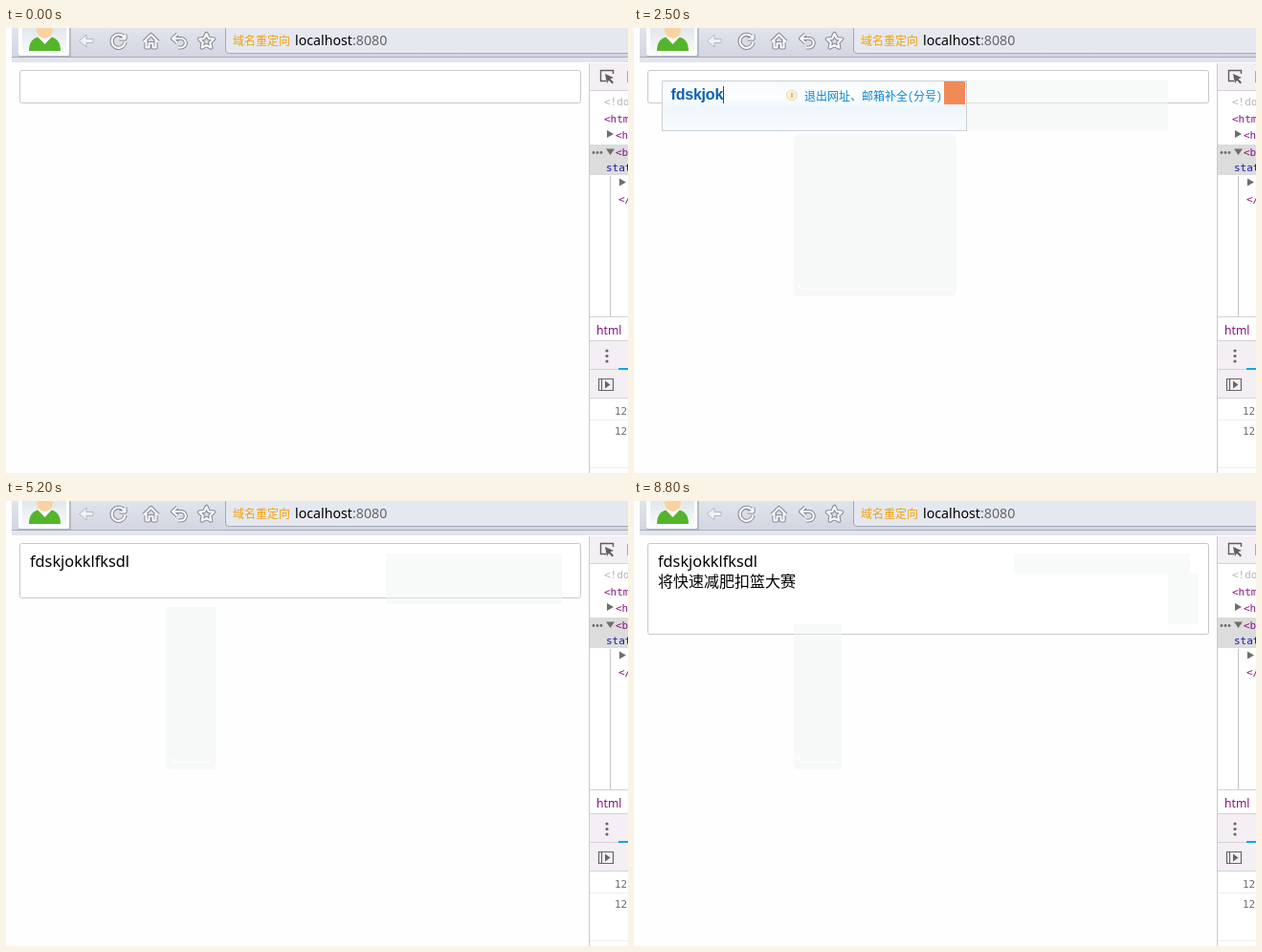
Recreate the animation shown at these times as an HTML page. Size 650 px wide and 466 px high, loop 9100 ms.

```html
<!DOCTYPE html>
<html lang="zh-CN">
<head>
<meta charset="utf-8">
<title>Input method demo</title>
<style>
html, body { margin: 0; width: 100%; height: 100%; overflow: hidden; background: #fefefe; }
svg { display: block; }
text { white-space: pre; }
.cjk { font-family: "Noto Sans CJK SC", "Noto Sans CJK", sans-serif; }
.ime { font-family: "Noto Sans Mono CJK SC", "Noto Sans CJK SC", "Noto Sans CJK", monospace; }
.ui { font-family: "Noto Sans", "Noto Sans CJK SC", sans-serif; }
.code { font-family: "DejaVu Sans Mono", monospace; }
.bold { font-family: "Liberation Sans", Arial, sans-serif; font-weight: bold; }
</style>
</head>
<body>
<svg width="650" height="466" viewBox="0 0 650 466">
  <defs>
    <linearGradient id="bar" x2="0" y2="1"><stop stop-color="#e2e4ec"/><stop offset="1" stop-color="#d3d6e1"/></linearGradient>
    <linearGradient id="pop" x2="0" y2="1">
      <stop stop-color="#f7fafc"/><stop offset=".3" stop-color="#fcfdfe"/>
      <stop offset=".55" stop-color="#eff7fc"/><stop offset="1" stop-color="#f8fbfc"/>
    </linearGradient>
    <linearGradient id="panel" x2="0" y2="1"><stop stop-color="#eef6fb"/><stop offset=".5" stop-color="#fbfdfe"/><stop offset="1" stop-color="#f1f7fb"/></linearGradient>
    <linearGradient id="photo" x2="0" y2="1"><stop stop-color="#dfe5ea"/><stop offset="1" stop-color="#f8fafb"/></linearGradient>
    <filter id="soft" x="-10%" y="-10%" width="125%" height="125%"><feDropShadow dx="1.5" dy="1.5" stdDeviation="1.3" flood-opacity=".45"/></filter>
    <clipPath id="frame"><rect x="17" y="0" width="47" height="24"/></clipPath>
  </defs>
  <g id="chrome"></g>
  <g id="live"></g>
</svg>
<script>
const LOOP = 9100, LINE = 21;
const BLUE = '#0a86d2', RED = '#e8000c', ORANGE = '#f28a58';

const text = (x, y, s, fill, size, cls = 'ui', more = '') =>
  `<text x="${x}" y="${y}" fill="${fill}" font-size="${size}" class="${cls}" ${more}>${s.replace(/</g, '&lt;')}</text>`;
const rect = (x, y, w, h, fill, more = '') =>
  `<rect x="${x}" y="${y}" width="${w}" height="${h}" fill="${fill}" ${more}/>`;
const path = (d, fill, stroke = 'none', w = 1, more = '') =>
  `<path d="${d}" fill="${fill}" stroke="${stroke}" stroke-width="${w}" ${more}/>`;
const disc = (x, y, r, fill, more = '') => `<circle cx="${x}" cy="${y}" r="${r}" fill="${fill}" ${more}/>`;
const move = (x, y, s, opacity = 1) => `<g transform="translate(${x} ${y})" opacity="${opacity}">${s}</g>`;

function browserBar() {
  // White strokes with a thin grey outline.
  const icon = d => path(d, 'none', '#858993', 4.2, 'stroke-linejoin="round"') + path(d, 'none', '#fafbfd', 2.1, 'stroke-linejoin="round"');
  return rect(6, 0, 644, 30, 'url(#bar)') + rect(6, 30, 644, 6, '#e3e4ed') + rect(6, 30, 644, 1, '#a9adbb') +
    rect(13, -4, 55, 35, '#9ca2ae', 'rx="2" opacity=".55"') + rect(13, -4, 53, 33, '#fbfcfd', 'rx="2"') +
    rect(17, -2, 46, 27, 'url(#photo)') +
    `<g clip-path="url(#frame)">` +
    path('M24 24Q24 11 35 9H46Q57 11 57 24Z', '#54b52b') +
    path('M33 9L40.500 17L48 9Z', '#fff') +
    `<ellipse cx="40.500" cy="2" rx="8.500" ry="9" fill="#f8d3a2"/></g>` +
    path('M91 11.500H84V7L76.500 13.500L84 20V15.500H91Z', '#eff1f5', '#b4b8c3') +
    icon('M123.500 10A7 7 0 1 0 124.500 15M124.500 6.500V11.500H118.500') +
    icon('M144 14.500L151.500 7L159 14.500M146.500 13V20.500H149.500V16H153.500V20.500H156.500V13') +
    icon('M179 6.500L174 11L179 15.500M174.500 11H183A4.700 4.700 0 0 1 183 20.500H180') +
    icon('M209.500 6L211.900 11L217.200 11.600L213.300 15.300L214.300 20.600L209.500 18L204.700 20.600L205.700 15.300L201.800 11.600L207.100 11Z') +
    path('M660 26.500H233Q229.500 26.500 229.500 23V-2H660', '#e6e8f0', '#a3a8b7') +
    text(237, 17.500, '域名重定向', '#f3a100', 12, 'cjk') +
    text(302, 18, 'localhost', '#000', 14.2) +
    text(362, 18, ':8080', '#666', 14.2);
}

function devTools() {
  const line = y => rect(610, y, 40, 1, '#d5d0d5');
  const code = (x, y, s, fill) => text(x, y, s, fill, 11, 'code');
  const tag = '#881280', dim = '#6e6e6e';
  const right = (x, y) => path(`M${x} ${y - 4}L${x + 7} ${y}L${x} ${y + 4}Z`, dim);
  return rect(610, 37, 40, 429, '#fff') + rect(609, 37, 1, 429, '#cbcbcb') +
    rect(610, 37, 40, 28, '#f4eff4') + line(65) +
    path('M627 55.500H621.500V44.500H634.500V48', 'none', '#5f5f5f', 1.4) +
    path('M626 48L635 52L631.500 53.200L635 57L633.500 58.500L630 54.800L628 58Z', '#5f5f5f') + rect(649, 45, 1, 12, '#aaa') +
    code(625, 81, '<!doc', '#b4b4b4') + code(625, 99, '<html', tag) +
    right(628, 111) + code(637, 116, '<he', tag) +
    rect(610, 122, 40, 32, '#dcdcdc') + [614, 618, 622].map(x => disc(x, 130.500, 1.400, dim)).join('') +
    path('M627 126.500H636L631.500 133Z', dim) + code(637, 134, '<bo', tag) +
    code(627, 150, 'stat', '#1a1aa6') + right(641, 161.500) + code(640, 183, '</b', tag) +
    rect(631, 155, 1, 147, '#c4c4c4') + line(302) +
    text(617, 321, 'html', tag, 12.2) + line(327) +
    rect(610, 328, 40, 30, '#f4eff4') + [338, 343.500, 349].map(y => disc(628, y, 1.600, '#666')).join('') +
    line(357) + rect(640, 356, 10, 2, '#10a5e8') +
    rect(610, 358, 40, 30, '#f4eff4') + line(387) +
    path('M619.500 367.500H634.500V379.500H619.500ZM622.500 367.500V379.500', 'none', '#666', 1.2) + path('M626 369.500L631.500 373.500L626 377.500Z', '#666') +
    code(636, 405, '12', dim) + rect(610, 410, 40, 1, '#ededed') + code(636, 426, '12', dim) + rect(610, 460, 40, 1, '#ededed');
}

// Width of a candidate: half-width Latin, full-width Han.
const span = s => [...s].reduce((w, c) => w + (c < '\u0100' ? 8 : 16), 0);
const pen = document.createElement('canvas').getContext('2d');
pen.font = 'bold 16px "Liberation Sans", Arial, sans-serif';

function typed(x, y, keys, gap, fill, caret) {
  const end = x + pen.measureText(keys).width + gap * keys.length;
  return text(x, y, keys, fill, 16, 'bold', `letter-spacing="${gap}"`) + rect(Math.round(end), y - 14, 1, 18, caret);
}

function shell(x, y, w, inside) {
  return rect(x + .5, y + .5, w - 1, 52, 'url(#pop)', 'stroke="#c9d0d5"') +
    rect(x + w - 24, y + 1, 22, 24, ORANGE) + inside;
}

function candidates({ x, y = 55, keys, words }) {
  let at = x + 9, list = '';
  words.split(' ').forEach((word, i) => {
    const s = `${i + 1}.${word}`;
    list += text(at, y + 46, s, i ? BLUE : RED, 16, 'ime');
    at += span(s) + 12;
  });
  const w = at + 44 - x, mid = y + 40.500;
  return shell(x, y, w,
    rect(x + 7, y + 28, w - 36, 1, '#c3dff0') +
    typed(x + 9.5, y + 20, keys, -.45, '#1657a5', RED) + list +
    path(`M${at + 6} ${mid - 5}V${mid + 5}L${at} ${mid}Z`, '#9bcdf0') +
    path(`M${at + 13} ${mid - 5}V${mid + 5}L${at + 19} ${mid}Z`, '#0877cc'));
}

function address({ x, y = 55, keys, width }) {
  const r = x + width;
  return shell(x, y, width,
    typed(x + 9.5, y + 20, keys, -.2, '#0861b5', '#244a72') +
    disc(r - 183, y + 15.500, 5.500, '#f8f0d5', 'stroke="#e3dccb"') + rect(r - 184, y + 13, 2, 5, '#e0bd68') +
    text(r - 170, y + 20.500, '退出网址、邮箱补全(分号)', BLUE, 12, 'ime'));
}

const icons = [
  path('M3 4L10 11', 'none', '#8fb0cb', 4, 'stroke-linecap="round"') + disc(-3, -3, 7.500, '#c9e7fa', 'stroke="#7fb5dc" stroke-width="2"'),
  path('M-6 -12Q0 -8 6 -12L14 -6L11 1L8 0V12H-8V0L-11 1L-14 -6Z', '#e8567f') + disc(0, 1, 4, '#fff'),
  rect(-11, -12, 24, 24, '#f8fbfd', 'rx="3" stroke="#9fb7c9"') + path('M-7 -7H0M-7 -2H-2M-6 7Q-2 2 2 7T10 6', 'none', '#4d84b5', 1.5) + path('M0 -8L3 -10L10 1L6 3Z', '#fff', '#6d8ea8'),
  disc(-1, 0, 12, '#2d91dc'),
  disc(0, 0, 12, '#f9b81f') + disc(-4, -3, 1.500, '#c98a14') + disc(4, -3, 1.500, '#c98a14') + path('M-5 4Q0 8 5 4', 'none', '#c98a14', 1.2),
  rect(-14, -7, 28, 19, '#3ba5e2', 'rx="2"') + text(-12, 5, 'com', '#fff', 11, 'bold') + disc(9, -7, 6.500, '#f8cb55') + text(5, -4, '@', '#fff', 9, 'bold'),
  text(-14, 5, 'En', '#555', 14.5, 'bold') + rect(4, -8, 10, 17, '#f28b1e') + text(5, 5, 'g', '#fff', 14, 'bold'),
  path('M-12 12Q-12 1 0 1T12 12Z', '#6cae43') + disc(-1, -5, 7, '#f5cd96') + path('M-9 -5Q-9 -13 -1 -13T7 -5Q-1 -10 -9 -5Z', '#8a5427') +
    rect(-14, -2, 28, 12, '#fff8e8', 'rx="2" stroke="#e5a34c"') + text(-12, 7, '周禾木', '#a35d17', 8, 'cjk'),
  rect(-12, -12, 24, 24, '#fff', 'stroke="#43a73d" stroke-width="2.500"') + path('M-8 -7H8M2 -7Q-2 2 -8 6M0 -2V9M2 -1L8 5', 'none', '#38782f', 1.8)
];
const labels = '搜索S 换肤H 手写X 网站W 表情F 邮箱Y 英文E 人名R 笔画B'.split(' ');

function panel({ x }) {
  const cells = labels.map((s, i) => {
    const cx = 31 + i % 3 * 50, cy = 23 + Math.floor(i / 3) * 50.500, on = i === 5;
    return (on ? rect(cx - 23.5, cy - 17, 49, 49, '#eaf6fd', 'rx="4" stroke="#8fc3e4"') : '') +
      move(cx, cy, icons[i]) +
      text(cx - 19, cy + 26.500, s.slice(0, 2), on ? BLUE : '#111', 12, 'cjk') +
      text(cx + 5.5, cy + 26, `(${s[2]})`, on ? BLUE : '#6284a0', 11);
  });
  return move(x, 113, rect(.5, .5, 163, 163, 'url(#panel)', 'rx="5" stroke="#8996a1" filter="url(#soft)"') + cells.join(''));
}

// Faint marks left behind by closed windows.
const trail = ([x, y, w, h]) => rect(x, y, w, h, '#f0f6f4', 'opacity=".5"');
const stain = ([right, top]) => {
  const whole = right > 300;
  const start = top > 111 ? `M167 ${top}` : `M167 117Q167 ${top} 172 ${top}`;
  const end = whole ? `H331Q${right} ${top} ${right} 117V275Q${right} 281 331 281` : `H${right}V281`;
  return path(`${start}${end}H172Q167 281 167 276Z`, '#f0f6f4', 'none', 1, 'opacity=".5"') +
    path(`M172 268Q172 273.500 177 273.500H${right - 5}`, 'none', '#fff', 1.5);
};

const home = n => [25, n];
const word1 = 'fdskjok', word2 = 'fdskjokklfksdl', word3 = '将快速减肥扣篮大赛';
const pick = (x, keys, words, y) => ({ pop: { x, y, keys, words } });
const mail1 = { x: 29, keys: word1, width: 319 }, mail2 = { x: 84, keys: 'klfksdl', width: 313 };
const tailK = ' 开了房 快乐飞 克里夫 科洛佛';

// Each step changes part of the state and keeps the rest.
const steps = [
  [0, { bottom: 79, lines: [], caret: null, pop: null, panel: null, trails: [], stain: null }],
  [600, { caret: home(0) }],
  [900, pick(29, 'f', '发 飞 非 房 分')],
  [1100, { caret: null }],
  [1300, { caret: home(0), ...pick(29, "f'd", '发的 反对 放到 分到 发达') }],
  [1400, pick(29, "f'd's", '发的时 反倒是 发大水 放淡色 房顶上')],
  [1500, pick(29, "f'd's'k'j", '发的时刻就 发的速快 发到手快 房东说可 分到十块')],
  [1600, { ...pick(29, "f'd's'k'j'ok", '发的时刻就ok 反倒是 发大水 放淡色 房顶上'), trails: [[510, 55, 48, 53]] }],
  [1800, { panel: { x: 166 } }],
  [2000, { panel: null, caret: null, stain: [337, 111] }],
  [2100, { pop: mail1, trails: [[348, 55, 210, 53]] }],
  [2600, { lines: [word1], bottom: 81, caret: [80, 0], pop: { ...mail1, opacity: .4 } }],
  [2700, { pop: null }],
  [3100, { caret: null, ...pick(84, "k'l", '快乐 开了 可乐 考虑 快来') }],
  [3200, pick(84, "k'l'f'k's", '快乐飞快死' + tailK)],
  [3300, pick(84, "k'l'f'k's'd'l", '快乐飞快死掉了' + tailK)],
  [3400, { panel: { x: 221 }, stain: [219, 111] }],
  [3500, { panel: null }],
  [3600, { pop: mail2, trails: [[397, 55, 184, 53]] }],
  [4000, { lines: [word2], caret: [130, 0], pop: { ...mail2, opacity: .5 } }],
  [4100, { pop: { ...mail2, opacity: .2 } }],
  [4200, { pop: null }],
  [4700, { bottom: 102, caret: home(1) }],
  [5200, { caret: null }],
  [5700, { caret: home(1) }],
  [6000, pick(29, "j'k's", '就看书 就开始 加快速 尽快送 健康所', 76)],
  [6100, pick(29, "j'k's'j'f", '将快速减肥 就开始 加快速 尽快送 健康所', 76)],
  [6200, { caret: null, ...pick(29, "j'k's'j'f'k'l", '将快速减肥扣篮 就看手机 将快速减 加快速降 就看书籍', 76) }],
  [6300, { ...pick(29, "j'k's'j'f'k'l'd's", word3 + ' 就开始 加快速 尽快送 健康所', 76),
    trails: [[397, 55, 184, 21], [558, 76, 32, 53]], stain: [217, 129] }],
  [6600, { lines: [word2, word3], caret: [169, 1], pop: null }],
  [7100, { bottom: 123, caret: home(2) }],
  [7300, { bottom: 140, caret: home(3) }],
  [7800, { caret: null }],
  [8300, { caret: home(3) }],
  [8800, { caret: null }]
];
let last = {};
const states = steps.map(([at, change]) => (last = { ...last, ...change, at }));

function draw(s) {
  let out = rect(14.5, 44.5, 586, s.bottom - 45, '#fff', 'rx="2" stroke="#c8c8c8"');
  out += s.trails.map(trail).join('');
  if (s.stain) out += stain(s.stain);
  s.lines.forEach((line, i) => {
    out += text(25, 69 + i * LINE, line, '#000', i ? 16 : 16.3, i ? 'cjk' : 'ui');
  });
  if (s.caret) out += rect(s.caret[0], 52 + s.caret[1] * LINE, 1, LINE, '#000');
  if (s.pop) out += move(0, 0, s.pop.words ? candidates(s.pop) : address(s.pop), s.pop.opacity);
  if (s.panel) out += panel(s.panel);
  return out;
}

const live = document.getElementById('live');
document.getElementById('chrome').innerHTML = browserBar() + devTools();
let shown;
function tick() {
  const t = performance.now() % LOOP;
  const now = states.findLast(s => s.at <= t);
  if (now !== shown) live.innerHTML = draw(shown = now);
  requestAnimationFrame(tick);
}
tick();
</script>
</body>
</html>
```
